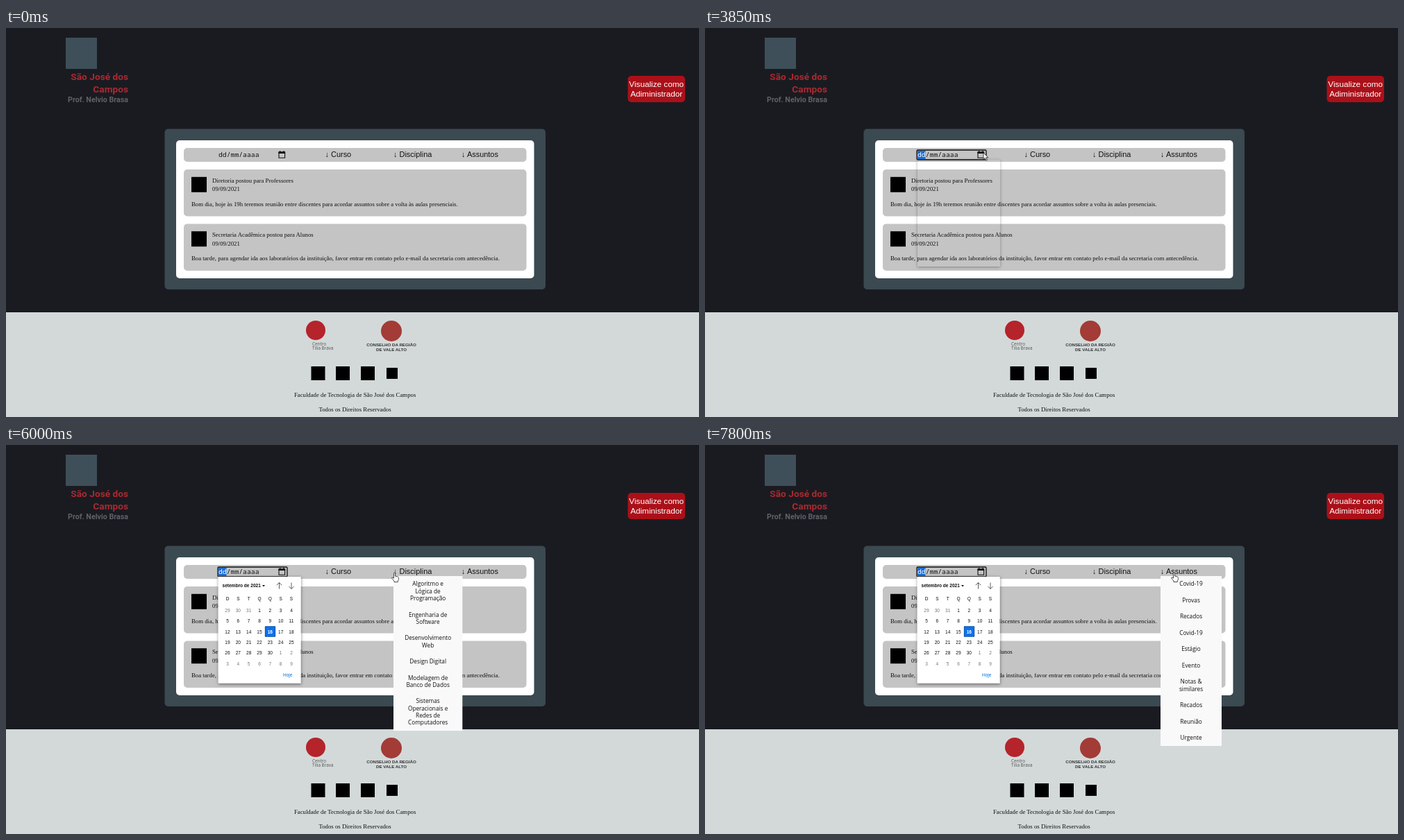
Write an HTML page that moves like this. It is 998x561 px and loops after 8000 ms.

```html
<!DOCTYPE html>
<html lang="pt-BR">
<head>
<meta charset="utf-8">
<title>Mural de avisos</title>
<style>
html, body { margin: 0; width: 100%; height: 100%; overflow: hidden; background: #1a1b21; }
svg { display: block; width: 998px; height: 561px; }
text { white-space: pre; }
.serif { font: 8.76px "Liberation Serif", serif; fill: #111; }
.sans { font: 10.94px "Liberation Sans", sans-serif; fill: #111; }
.mono { font: 9.75px "Noto Sans Mono", monospace; fill: #111; }
.button { font: 11.75px "Liberation Sans", sans-serif; fill: #fff; }
.school { font: bold 13.7px Roboto, sans-serif; fill: #a92a30; }
.unit { font: bold 10.7px Roboto, sans-serif; fill: #5d6268; }
.small { font: 6.4px "Open Sans", sans-serif; fill: #555; }
.caps { font: bold 6.2px "Liberation Sans", sans-serif; fill: #333; }
.menu { font: 8.25px "Open Sans", sans-serif; fill: #111; }
.cal { font: 6.56px "Liberation Sans", sans-serif; fill: #111; }
.bold { font-weight: bold; }
.mid { text-anchor: middle; }
.end { text-anchor: end; }
#shadow { width: 119px; height: 153.5px; margin: 10px; box-shadow: 0 1px 4px rgba(0, 0, 0, .5); }
</style>
</head>
<body>
<svg id="stage" viewBox="0 0 998 561">
  <rect width="998" height="561" fill="#1a1b21"/>

  <rect x="86" y="14" width="45" height="45" fill="#3e4f59"/>
  <text class="school end" x="176" y="74.5">São José dos</text>
  <text class="school end" x="176" y="92.5">Campos</text>
  <text class="unit end" x="176" y="107">Prof. Nelvio Brasa</text>

  <rect x="895.5" y="69" width="82.5" height="38" rx="5" fill="#ab1019"/>
  <text class="button mid" x="936.7" y="85.3">Visualize como</text>
  <text class="button mid" x="936.7" y="98.9">Adiministrador</text>

  <rect x="228.5" y="145.5" width="548.5" height="231.5" rx="5" fill="#3b4951"/>
  <rect x="245" y="162" width="515.5" height="199" rx="5" fill="#fff"/>
  <g id="bars" fill="#c4c4c4">
    <rect x="256" y="173" width="493.5" height="20" rx="5"/>
    <rect x="256" y="204" width="493.5" height="67.5" rx="5"/>
    <rect x="256" y="282.4" width="493.5" height="67.5" rx="5"/>
  </g>
  <g id="posts"></g>
  <text class="sans" x="459.5" y="185.8">↓ Curso</text>
  <text class="sans" x="558" y="185.8">↓ Disciplina</text>
  <text class="sans" x="656" y="185.8">↓ Assuntos</text>

  <rect id="picked" x="306" y="177" width="11.5" height="12" fill="#1a6fd8"/>
  <text class="mono" x="306" y="186.3"><tspan id="day">dd</tspan>/mm/aaaa</text>
  <path d="M393 179h8.6v8.3h-8.6z" fill="none" stroke="#111" stroke-width="1.1"/>
  <path d="M392.5 178.5h9.6v2.4h-9.6zM394 177.3h1.3v2h-1.3zM399.3 177.3h1.3v2h-1.3z"/>
  <rect id="ring" x="305" y="176" width="100" height="14" rx="1.5" fill="none" stroke="#111" stroke-width="1.3"/>

  <rect y="410" width="998" height="151" fill="#d3d9d9"/>
  <circle cx="446" cy="436" r="14" fill="#b5232b"/>
  <text class="small" x="441" y="458">Centro</text>
  <text class="small" x="441" y="464">Tília Brava</text>
  <circle cx="555" cy="437" r="15" fill="#a33b36"/>
  <text class="caps mid" x="555" y="459.3">CONSELHO DA REGIÃO</text>
  <text class="caps mid" x="555" y="466.3">DE VALE ALTO</text>
  <path d="M439.5 488h20v20h-20zM475 488h20v20h-20zM511 488h20v20h-20zM548 490h16v16h-16z"/>
  <text class="serif mid" x="502.6" y="531.7">Faculdade de Tecnologia de São José dos Campos</text>
  <text class="serif mid" x="502.6" y="553">Todos os Direitos Reservados</text>

  <foreignObject id="popup" x="295.5" y="180" width="140" height="175"><div id="shadow"></div></foreignObject>
  <g id="calendar"></g>
  <g id="menus"></g>
  <g id="cursor" fill="#fff" stroke="#222" stroke-width=".8" stroke-linejoin="round">
    <path id="arrow" d="M0 0V9.3L2.2 7.3 3.8 11 5.4 10.3 3.9 6.8H6.8Z"/>
    <path id="hand" d="M-1 8V1a1 1 0 0 1 2 0V5l3 .6 1.4.8Q6 7 6 8.5 6 10.5 4.8 12V13.5H-.5V12L-3.8 8.2Q-4 6.8-2.6 7Z"/>
  </g>
</svg>
<script>
const $ = id => document.getElementById(id);
const text = (x, y, s, cls, more = '') => `<text x="${x}" y="${y}" class="${cls}" ${more}>${s}</text>`;
const rect = (x, y, w, h, fill) => `<rect x="${x}" y="${y}" width="${w}" height="${h}" fill="${fill}"/>`;
const show = (id, on) => $(id).style.display = on ? '' : 'none';

const posts = [
  ['Diretoria postou para Professores',
    'Bom dia, hoje às 19h teremos reunião entre discentes para acordar assuntos sobre a volta às aulas presenciais.'],
  ['Secretaria Acadêmica postou para Alunos',
    'Boa tarde, para agendar ida aos laboratórios da instituição, favor entrar em contato pelo e-mail da secretaria com antecedência.']
];
$('posts').innerHTML = posts.map(([title, body], i) => {
  const y = 78.4 * i;
  return rect(267, 214.8 + y, 22, 22, '#000') + text(297, 222.7 + y, title, 'serif') +
    text(297, 235.4 + y, '09/09/2021', 'serif') + text(267, 256.9 + y, body, 'serif');
}).join('');

function drawCalendar() {
  let out = rect(305.5, 190, 119, 153.5, '#fff') +
    text(311.5, 205, 'setembro de 2021', 'cal bold') +
    '<path d="M369 202h4l-2 2.3z"/>' +
    '<path d="M393.5 207.5v-9m-3.7 3.7 3.7-3.7 3.7 3.7M411 198.5v9m-3.7-3.7 3.7 3.7 3.7-3.7" fill="none" stroke="#333" stroke-width=".8"/>' +
    rect(373, 261.5, 15, 15, '#0b73ee') +
    '<path d="M373.3 261.8h14.4v14.4h-14.4z" fill="none" stroke="#123f7c" stroke-width=".7"/>';
  const colX = c => 319 + 15.33 * c;
  [...'DSTQQSS'].forEach((d, c) => out += text(colX(c), 224.3, d, 'cal mid'));
  for (let i = 0; i < 42; i++) {
    const other = i < 3 || i > 32, today = i === 18;
    const day = i < 3 ? 29 + i : i < 33 ? i - 2 : i - 32;
    out += text(colX(i % 7), 240.8 + 15.35 * (i / 7 | 0), day, 'cal mid' + (today ? ' bold' : ''),
      `style="fill:${today ? '#fff' : other ? '#777' : '#111'}"`);
  }
  $('calendar').innerHTML = out + text(399, 334.4, 'Hoje', 'cal', 'style="fill:#0b6fd8"');
}
drawCalendar();

// Each menu: left edge, width, first and last moment, items with "|" between lines
const menus = [
  [459.5, 87.5, 4700, 5700, ['ADM', 'Banco de|Dados', 'DSM', 'Gestão de|Produção|Industrial', 'Logística',
    'Manufatura|Avançada', 'Projetos de|Estruturas|Aeronauticas']],
  [558, 99.3, 5900, 6950, ['Algoritmo e|Lógica de|Programação', 'Engenharia de|Software', 'Desenvolvimento|Web',
    'Design Digital', 'Modelagem de|Banco de Dados', 'Sistemas|Operacionais e|Redes de|Computadores']],
  [656, 88, 7400, 8000, ['Covid-19', 'Provas', 'Recados', 'Covid-19', 'Estágio', 'Evento', 'Notas &amp;|similares',
    'Recados', 'Reunião', 'Urgente']]
];
$('menus').innerHTML = menus.map(([x, w, , , items], i) => {
  let y = 203.4, lines = '';
  for (const item of items) {
    for (const line of item.split('|')) {
      lines += text(x + w / 2, y, line, 'menu mid');
      y += 10.3;
    }
    y += 13.2;
  }
  return `<g id="menu${i}">${rect(x, 189, w, y - 203.7, '#f9f9f9')}${lines}</g>`;
}).join('');

// Pointer stops: time, x, y
const stops = [
  [1800, 845, 299], [2600, 341, 189], [2700, 341, 189], [3450, 401, 180], [4350, 401, 180],
  [4650, 464, 187], [5000, 485, 186], [5500, 485, 186], [5650, 505.5, 183.5], [5900, 558, 184],
  [6400, 572.5, 185], [7150, 640, 187], [7250, 640, 187], [7500, 666, 185], [7750, 675.5, 184], [8000, 675.5, 184]
];
function pointerAt(t) {
  const i = Math.max(1, stops.findIndex(s => s[0] > t));
  const [t0, x0, y0] = stops[i - 1], [t1, x1, y1] = stops[i];
  const p = Math.max(0, (t - t0) / (t1 - t0)), k = p * p * (3 - 2 * p);
  return [x0 + (x1 - x0) * k, y0 + (y1 - y0) * k];
}
const labels = [[459, 498], [557, 614], [656, 710]];

function draw(now) {
  const t = Math.floor(now % 8000 / 50) * 50;
  const focused = t >= 3700;
  show('ring', focused);
  show('picked', focused);
  $('day').style.fill = focused ? '#fff' : '';
  $('popup').style.opacity = Math.min(1, Math.max(0, (t - 3750) / 150));
  $('calendar').style.opacity = Math.min(1, Math.max(0, (t - 3850) / 100));
  menus.forEach(([, , from, to], i) => show('menu' + i, t >= from && t < to));

  const [x, y] = pointerAt(t);
  const link = t > 4350 && labels.some(([a, b]) => x >= a && x <= b);
  show('cursor', t >= 1850);
  show('hand', link);
  show('arrow', !link);
  $('cursor').setAttribute('transform', `translate(${x} ${y})`);
}
function tick() {
  draw(performance.now());
  requestAnimationFrame(tick);
}
tick();
</script>
</body>
</html>
```
